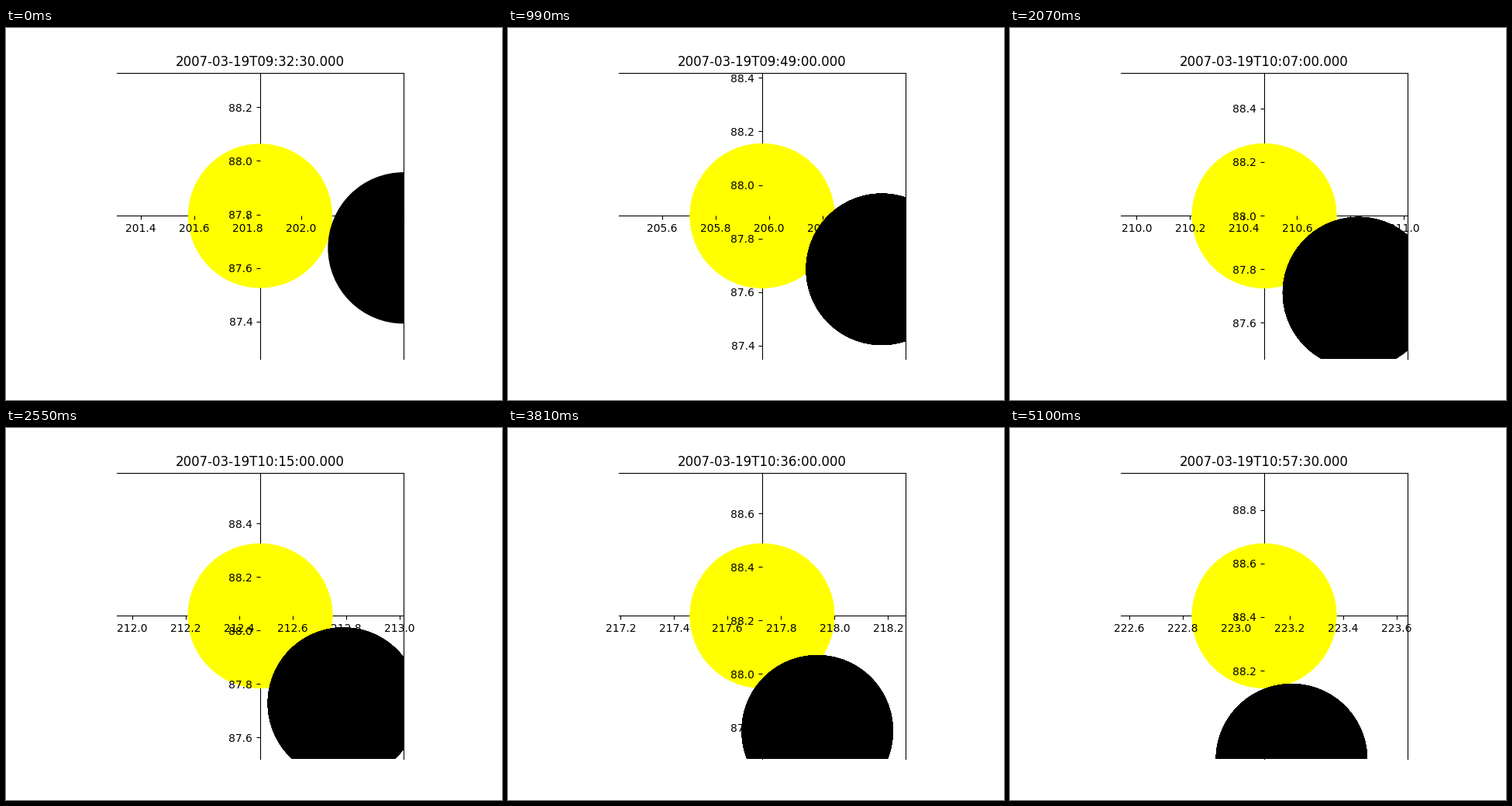
Recreate the animation shown at these times as a matplotlib script. Size 640 by 480 pixels, loop 5130 ms.

```python
import numpy as np
import matplotlib.pyplot as plt
from matplotlib.animation import FuncAnimation
from matplotlib.patches import Circle
from matplotlib.ticker import MultipleLocator

FRAMES = 171
SUN_R = 0.26775
MOON_R = 0.281
HALF = 2 * SUN_R
LAYERS = 20  # stacked copies harden the disc edges as the loop goes on

fig = plt.figure(figsize=(6.4, 4.8), dpi=100)
ax = fig.add_subplot()
ax.set_aspect("equal")
for side in ("left", "bottom"):
    ax.spines[side].set_position("center")
for spine in ax.spines.values():
    spine.set_zorder(0.5)
for axis in (ax.xaxis, ax.yaxis):
    axis.set_major_locator(MultipleLocator(0.2))
    axis.set_major_formatter("{x:.1f}")
    axis.set_zorder(1.5)
title = ax.set_title("")


def stack(radius, color, zorder):
    discs = [Circle((0, 0), radius, color=color, zorder=zorder)
             for _ in range(LAYERS)]
    for disc in discs:
        ax.add_patch(disc)
    return discs


suns = stack(SUN_R, "yellow", 1)
moons = stack(MOON_R, "black", 3)


def sun_position(n):
    azimuth = 201.847 + 0.125047 * n + 2.8e-7 * n * (FRAMES - 1 - n)
    zenith = 90.6533 - 3.08 * np.cos(np.radians(azimuth - 180))
    return azimuth, zenith


def moon_offset(n):
    dx = 0.5361 - 0.002738 * n + 1.101e-6 * n**2
    dy = -0.12 - 0.002405 * n - 2.9e-7 * n**2
    return dx, dy


def timestamp(n):
    minutes, s = divmod(34350 + 30 * n, 60)
    h, m = divmod(minutes, 60)
    return f"2007-03-19T{h:02d}:{m:02d}:{s:02d}.000"


def update(n):
    x, y = sun_position(n)
    dx, dy = moon_offset(n)
    for k, (sun, moon) in enumerate(zip(suns, moons)):
        sun.center = x, y
        moon.center = x + dx, y + dy
        sun.set_visible(k <= n)
        moon.set_visible(k <= n)
    ax.set_xlim(x - HALF, x + HALF)
    ax.set_ylim(y - HALF, y + HALF)
    title.set_text(timestamp(n))
    return [*suns, *moons, title]


anim = FuncAnimation(fig, update, frames=FRAMES, interval=30,
                     repeat=True, repeat_delay=0, blit=False)
plt.show()
```
